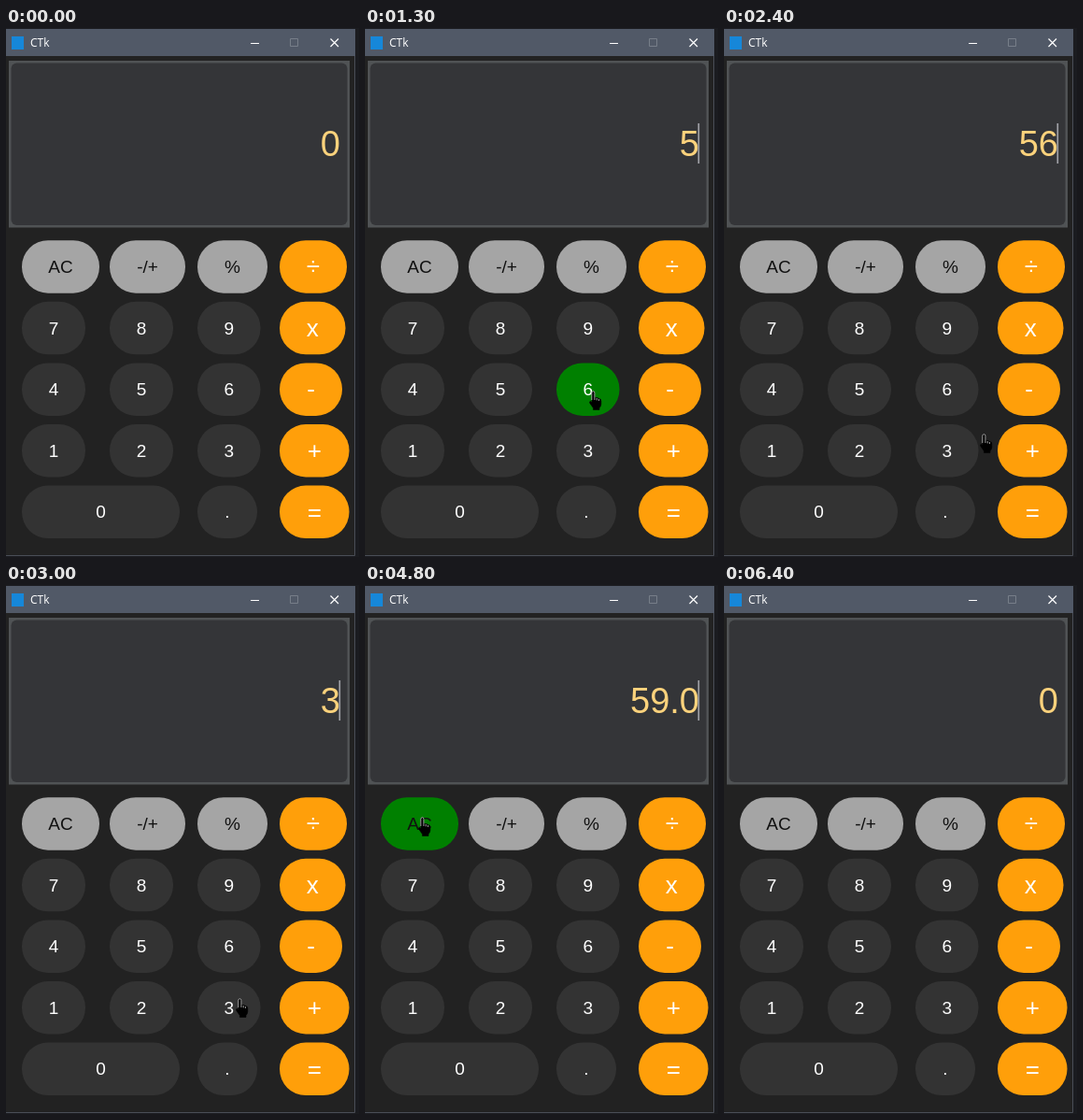
Animation of 378x566 px, one loop 6500 ms. Source, as an HTML page:

```html
<!DOCTYPE html>
<html lang="en">
<head>
<meta charset="utf-8">
<title>Calculator</title>
<style>
  html, body { margin: 0; width: 100%; height: 100%; overflow: hidden; background: #1b1c20; }
  svg { display: block; width: 378px; height: 566px; }
  text { font-family: "Liberation Sans", Arial, sans-serif; }
  #title { font: 12px "Open Sans", "Noto Sans", sans-serif; fill: #fff; }
  #value { font-size: 38px; fill: #fbd27c; text-anchor: end; }
  #keys text { font-size: 19px; fill: #fff; text-anchor: middle; }
  #keys .light text { fill: #111; }
  #keys .op text { font-size: 26px; }
  #keys rect { fill: #333; }
  #keys .light rect { fill: #a5a5a5; }
  #keys .op rect { fill: #ff9f0a; }
  #keys .hover rect { fill: #008000; }
</style>
</head>
<body>
<svg viewBox="0 0 378 566">
  <rect width="378" height="566" fill="#1b1c20"/>
  <rect y="30" width="374" height="535" fill="#222"/>
  <rect y="1" width="374" height="29" fill="#515967"/>
  <path d="M373.5 30V564.5H0" fill="none" stroke="#4a4e57"/>
  <rect x="6" y="9" width="13" height="14" fill="#1687d9"/>
  <text id="title" x="26" y="20">CTk</text>
  <g fill="none" stroke="#fff">
    <path d="M262 16.5h9"/>
    <path d="M304.5 11.5h8v8h-8z" stroke="#777e89"/>
    <path d="M347.5 11.5l8.5 8.5m0-8.5l-8.5 8.5" stroke-width="1.2"/>
  </g>
  <rect x="3" y="35" width="365" height="178.5" fill="#505355"/>
  <rect x="5.5" y="37.5" width="360" height="173.5" rx="6" fill="#343538"/>
  <text id="value" x="358" y="137">0</text>
  <rect id="caret" x="356.5" y="102" width="1.6" height="43" fill="#a4a5ab"/>
  <g id="keys"></g>
  <g id="hand">
    <path d="M3 2.2Q3 .6 4.4 .6T5.8 2.2V7.2Q7 6.6 8 7.8Q9.4 7.2 10.2 8.6Q12.8 8.4 12.8 11V14.4Q12.6 17 11 18.4V20.4H4.4V18.6L.8 13.4Q0 11.4 1.6 11.2L3 12.6Z"
      fill="#000" stroke="#000" stroke-width=".6"/>
    <path d="M2.8 10V2.4Q3 .6 4.4 .6T5.9 2.4V10M8.2 8V10.4M10.4 9V11"
      fill="none" stroke="#ddd" stroke-width=".7"/>
  </g>
</svg>
<script>
const LOOP = 6500, STEP = 100, KEY_H = 56.5;
const $ = id => document.getElementById(id);
const rowTop = r => 227.2 + r * 65.6;

// Label, left, right for each key
const rows = [
  [["AC", 17, 100], ["-/+", 111, 192], ["%", 205, 280], ["÷", 293, 365]],
  [["7", 17, 85], ["8", 111, 179], ["9", 205, 272.5], ["x", 293, 363.5]],
  [["4", 17, 85], ["5", 111, 179], ["6", 205, 272.5], ["-", 293, 360]],
  [["1", 17, 85], ["2", 111, 179], ["3", 205, 272.5], ["+", 293, 367.5]],
  [["0", 17, 186], [".", 205, 269], ["=", 293, 367.5]]
];

// Pointer stops: time, x, y
const path = [
  [200, 338, 500], [700, 174, 397], [900, 150, 388], [1000, 150, 388],
  [1300, 240, 388], [1450, 240, 388], [1700, 302, 426], [2100, 302, 426],
  [2700, 246, 442], [3200, 246, 442], [3700, 336, 507], [4200, 336, 507],
  [4700, 57, 248], [5200, 57, 248]
];

// A press drops the hover colour briefly and sets the display
const presses = [
  [1000, "5"], [1400, "56"], [1800, "56"], [2900, "3"], [3900, "59.0"], [5000, "0"]
];
const PRESS_TIME = 200;

function add(parent, tag, attrs) {
  const el = document.createElementNS("http://www.w3.org/2000/svg", tag);
  for (const name in attrs) el.setAttribute(name, attrs[name]);
  return parent.appendChild(el);
}

const keys = rows.flatMap((row, r) => row.map(([label, left, right]) => {
  const top = rowTop(r);
  const op = "÷x-+=".includes(label);
  const kind = op ? "op" : r === 0 ? "light" : "digit";
  const el = add($("keys"), "g", { class: kind });
  add(el, "rect", { x: left, y: top, width: right - left, height: KEY_H, rx: 28 });
  const text = add(el, "text", { x: (left + right) / 2, y: top + KEY_H / 2 + (op ? 8.7 : 6.6) });
  text.textContent = label;
  return { el, left, right, top };
}));

function pointerAt(t) {
  const next = path.findIndex(p => p[0] >= t);
  if (next < 0 || t < path[0][0]) return null;
  const b = path[next], a = path[Math.max(0, next - 1)];
  const k = a === b ? 0 : (t - a[0]) / (b[0] - a[0]);
  const ease = k * k * (3 - 2 * k);
  return { x: a[1] + (b[1] - a[1]) * ease, y: a[2] + (b[2] - a[2]) * ease };
}

function draw(t) {
  const hand = pointerAt(t);
  const press = presses.filter(p => p[0] <= t).pop();
  const pressed = press && t - press[0] < PRESS_TIME;
  const blink = t % 900;

  $("value").textContent = press ? press[1] : "0";
  $("caret").style.display = blink > 150 && blink < 650 ? "" : "none";
  $("hand").style.display = hand ? "" : "none";
  if (hand) $("hand").setAttribute("transform", `translate(${hand.x} ${hand.y})`);

  for (const key of keys) {
    const over = hand && hand.x + 4 >= key.left && hand.x + 4 <= key.right &&
      hand.y + 1 >= key.top && hand.y + 1 <= key.top + KEY_H;
    key.el.classList.toggle("hover", Boolean(over && !pressed));
  }
}

const start = performance.now();
function tick() {
  const t = (performance.now() - start) % LOOP;
  draw(Math.floor(t / STEP) * STEP);
  requestAnimationFrame(tick);
}
tick();
</script>
</body>
</html>
```
